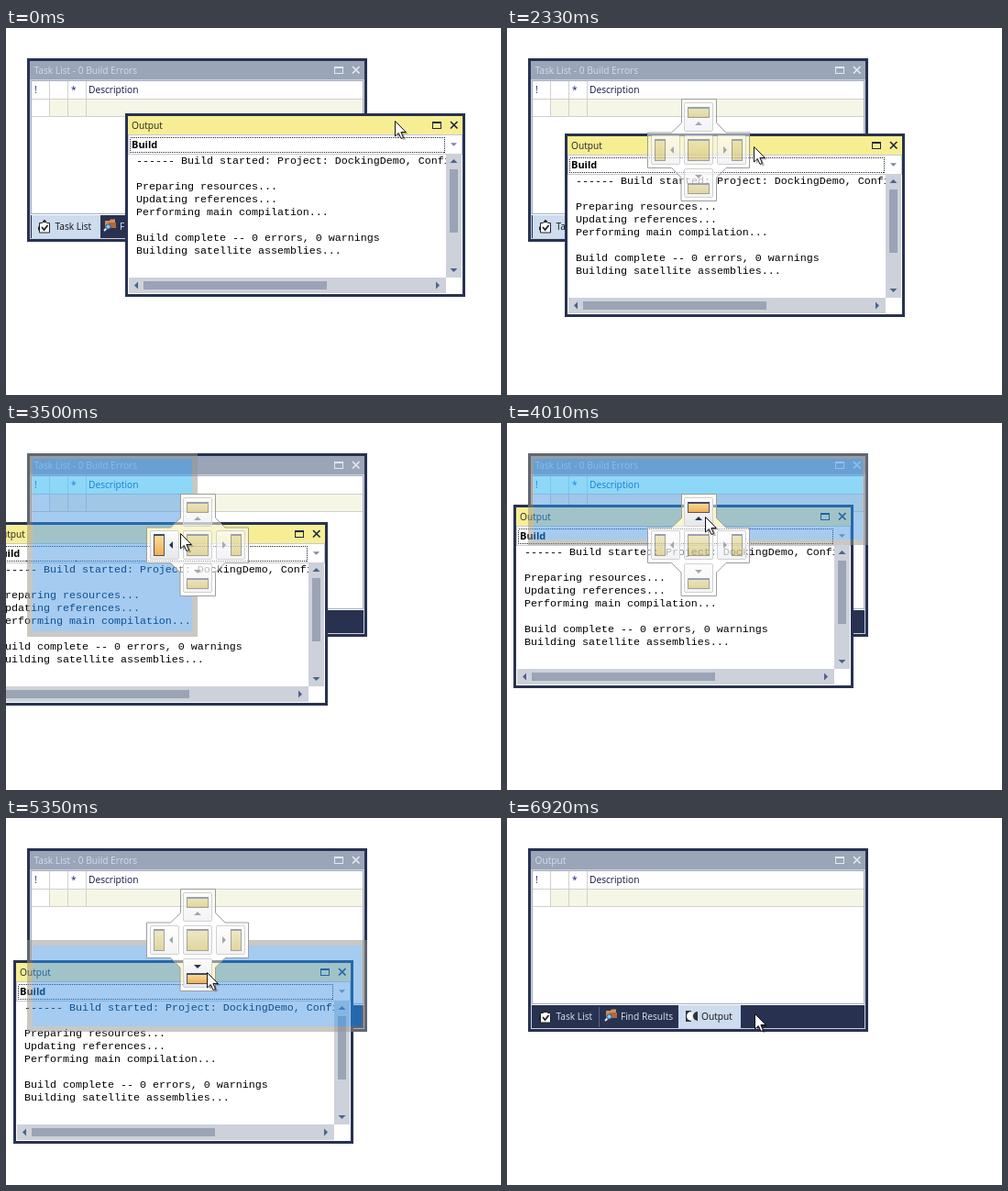
Animation, 540 px wide and 400 px high, one loop 8480 ms. Source, as an HTML page:

```html
<!DOCTYPE html>
<html lang="en">
<head>
<meta charset="utf-8">
<title>Docking windows</title>
<style>
html, body { margin: 0; width: 100%; height: 100%; overflow: hidden; background: #fff; }
svg { display: block; width: 540px; height: 400px; }
text { font: 10.2px "Open Sans", "Noto Sans", sans-serif; white-space: pre; }
.bold { font-size: 11px; font-weight: 700; }
.mono { font: 11.67px "Liberation Mono", monospace; }
rect { shape-rendering: crispEdges; }
#preview rect { clip-path: url(#around); }
.tint { mix-blend-mode: multiply; }
.glow { mix-blend-mode: screen; }
.face { fill-opacity: .5; }
.icon { fill: url(#pale); stroke: #a9a698; mix-blend-mode: multiply; }
.strip { fill: #9ba1af; }
.btn .tri { fill: #a3a7ae; }
.on .face { fill-opacity: 1; }
.on .icon { fill: url(#warm); stroke: #55545a; mix-blend-mode: normal; }
.on .strip { fill: #424c66; }
.on .tri { fill: #263354; }
</style>
</head>
<body>
<svg id="stage" viewBox="0 0 540 400" xmlns="http://www.w3.org/2000/svg"></svg>
<script>
const LOOP = 8480, STEP = 30, DOCKED = 6740;
const NAVY = '#283250', STEEL = '#9aa5b7', BAR = '#cdd1da', THUMB = '#9ba4b5', LINE = '#d0d0d0';

// time, pointer x, y, window x, y
const keys = [
  [0, 424, 101, 130, 93],
  [660, 424, 101, 130, 93],
  [1080, 338, 107, 130, 93],
  [1850, 338, 107, 130, 93],
  [2510, 254, 134, 45, 121],
  [2810, 254, 134, 46, 121],
  [3290, 170, 133, -38, 120],
  [3680, 206, 109, -3, 96],
  [4010, 216, 102, 7, 89],
  [4240, 216, 102, 7, 89],
  [4750, 218, 168, 8, 155],
  [5320, 218, 168, 8, 155],
  [5770, 265, 173, 55, 157],
  [6140, 265, 173, 55, 157],
  [DOCKED, 270, 204, 60, 188],
  [6920, 270, 213, 60, 188],
  [LOOP, 270, 213, 60, 188]
];

const rect = (x, y, w, h, fill, more = '') =>
  `<rect x="${x}" y="${y}" width="${w}" height="${h}" fill="${fill}" ${more}/>`;
const frame = (x, y, w, h, stroke, more = '') =>
  rect(x + .5, y + .5, w - 1, h - 1, 'none', `stroke="${stroke}" ${more}`);
const text = (x, y, s, fill = '#000', cls = '') =>
  `<text x="${x}" y="${y}" fill="${fill}" class="${cls}">${s}</text>`;
const path = (d, fill, more = '') => `<path d="${d}" fill="${fill}" ${more}/>`;
const group = (id, body) => `<g id="${id}">${body}</g>`;
const tri = (x, y, turn, size = 4, fill = '#4b6489', cls = '') =>
  path(`M${-size} ${size / 2}L0 ${-size / 2}L${size} ${size / 2}Z`, fill,
    `class="${cls}" transform="translate(${x} ${y}) rotate(${turn})"`);

// maximize and close glyphs
const caption = (x, y, c) => frame(x, y, 10, 8, c) + rect(x, y, 10, 2, c) +
  path(`M${x + 20} ${y}l7.5 7.5m0 -7.5l-7.5 7.5`, 'none', `stroke="${c}" stroke-width="1.7"`);

const listIcon = path('M36.5 212.5h3l2.5 -3.5l2.5 3.5h3v10.5h-11z', '#fff', 'stroke="#222"') +
  path('M39 217l2.5 3l4 -5', 'none', 'stroke="#222" stroke-width="1.8"') +
  path('M40 212a2 2 0 0 1 4 0', '#222') + path('M35 216l2 2l-2 3', '#222');
const findIcon = path('M108 210h5l1 -1.5h5v9h-11z', '#d68d50') + rect(112, 212, 8, 6, '#ab6b3e') +
  path('M107 221l3 -3', 'none', 'stroke="#e8edf5" stroke-width="2"') +
  '<circle cx="111.5" cy="216.5" r="2.6" fill="#8fc3ee" stroke="#1e5d9e"/>';
const outIcon = rect(195, 210, 6, 12, '#333') + path('M201 211a5 5 0 0 0 0 10z', '#fff') +
  path('M208 211a5 5 0 0 0 0 10z', '#333') + path('M203 212a5 5 0 0 0 0 8', 'none', 'stroke="#fff"');

function taskWindow() {
  const cols = [47, 67, 87].map(x => rect(x, 58, 1, 39, LINE)).join('');
  const tabs = group('open', rect(28, 204, 75, 25, '#cddcee')) +
    group('added', rect(100, 206, 1, 22, '#59657f') + rect(187, 204, 68, 25, '#cddcee') +
      outIcon + text(212, 220, 'Output', '#111')) +
    listIcon + text(53.5, 220, 'Task List', '#111', 'first') +
    findIcon + text(124, 220, 'Find Results', '#dce3f0');
  return rect(23, 33, 371, 200, NAVY) + rect(26, 36, 365, 21, STEEL) +
    `<text id="head" x="30.5" y="50" fill="#d3dced"></text>` + caption(358, 42, '#e3e9f3') +
    rect(26, 56, 365, 174, '#c8d2e2') + rect(27, 57, 363, 147, '#fff') +
    frame(27, 57, 363, 146, '#a8b0bf') +
    rect(48, 78, 341, 18, '#f5f6e6') + rect(28, 77, 361, 1, LINE) + rect(28, 96, 361, 1, LINE) + cols +
    text(31, 71, '!', '#16207a') + text(71, 71, '*', '#16207a') + text(90, 71, 'Description', '#101540') +
    rect(27, 204, 363, 25, NAVY) + tabs;
}

function outputWindow() {
  const lines = ['------ Build started: Project: DockingDemo, Configuration', '',
    'Preparing resources...', 'Updating references...', 'Performing main compilation...', '',
    'Build complete -- 0 errors, 0 warnings', 'Building satellite assemblies...'];
  return rect(0, 0, 371, 200, NAVY) + rect(3, 3, 365, 194, '#fff') + rect(3, 3, 365, 21, '#f7ee94') +
    text(7, 17, 'Output', '#222') + caption(335, 9, '#222840') +
    frame(3, 23, 365, 22, '#c3c9d4') +
    frame(5, 26, 344, 17, '#222', 'stroke-dasharray="1 1"') +
    text(7, 38, 'Build', '#000', 'bold') + tri(358.5, 34, 180, 3.5, '#7d889b') +
    `<g clip-path="url(#page)">${lines.map((s, i) => text(12, 55 + i * 14, s, '#000', 'mono')).join('')}</g>` +
    rect(350, 44, 17, 135, BAR) + rect(354, 61, 9, 69, THUMB) + tri(358.5, 52, 0) + tri(358.5, 171, 180) +
    rect(4, 179, 346, 17, BAR) + rect(20, 183, 200, 9, THUMB) + tri(12, 187.5, 270) + tri(341, 187.5, 90);
}

function button(id, x, y, [ix, iy, iw, ih], arrow) {
  return `<g id="${id}" class="btn">` +
    rect(x + .5, y + .5, 31, 31, 'url(#face)', 'class="face" stroke="#cfd1d4" rx="2"') +
    rect(ix + .5, iy + .5, iw, ih, 'none', 'class="icon"') +
    rect(ix, iy, iw + 1, 2, 'none', 'class="strip"') + (arrow ? tri(...arrow, 4, '#888', 'tri') : '') + '</g>';
}

const CROSS = 'M190.5 77.5V103.5L179.5 114H153.5V152.5H179.5L190 163V188.5H228.5V163L239 152.5H264.5V114H239L228.5 103.5V77.5Z';

function compass() {
  return path(CROSS, '#fff', 'opacity=".5"') +
    button('mid', 193, 117, [197, 121, 23, 23]) +
    button('top', 193, 81, [197, 86, 23, 11], [209, 104, 0]) +
    button('bottom', 193, 153, [197, 169, 23, 11], [209, 162, 180]) +
    button('left', 157, 117, [161, 121, 11, 23], [180, 133, 270]) +
    button('right', 229, 117, [245, 121, 11, 23], [238, 133, 90]) +
    path(CROSS, 'none', 'stroke="#9c9c9c"');
}

const layer = (cls, tint, glow) =>
  rect(0, 0, 0, 0, tint, `class="${cls} tint"`) + rect(0, 0, 0, 0, glow, `class="${cls} glow"`);
const gradient = (id, a, b) => `<linearGradient id="${id}" x2="0" y2="1">` +
  `<stop stop-color="${a}"/><stop offset="1" stop-color="${b}"/></linearGradient>`;
const arrowShape = 'M0 0V16.5L3.8 13L6.5 19L9 17.9L6.4 12H11.8Z';

// the preview is cut out around the compass
document.getElementById('stage').innerHTML =
  `<defs>${gradient('pale', '#f1ebc6', '#ebdfa4')}${gradient('warm', '#fbe0a0', '#efad55')}` +
  `${gradient('face', '#fdfdfd', '#e6e7ea')}` +
  `<clipPath id="page"><rect x="4" y="45" width="346" height="134"/></clipPath>` +
  `<clipPath id="around"><path clip-rule="evenodd" d="M0 0H540V400H0Z${CROSS}"/></clipPath></defs>` +
  rect(0, 0, 540, 400, '#fff') + group('task', taskWindow()) + group('out', outputWindow()) +
  group('preview', layer('pane', '#a1b3dc', '#0c508f') + layer('band', '#daffff', '#003c78') +
    rect(0, 0, 0, 0, 'none', 'class="edge" stroke="#969690" stroke-width="6" stroke-opacity=".52"')) +
  group('compass', compass()) +
  group('pointer', path(arrowShape, '#000', 'opacity=".28" transform="translate(2.5 2)"') +
    path(arrowShape, '#fff', 'stroke="#111"'));

const $ = id => document.getElementById(id);
const set = (el, attrs) => { for (const k in attrs) el.setAttribute(k, attrs[k]); };
const show = (id, on) => set($(id), { visibility: on ? 'inherit' : 'hidden' });
const first = document.querySelector('.first');

const zones = {
  mid: [192, 116, 226, 150], top: [190, 78, 228, 115], bottom: [190, 152, 228, 188],
  left: [154, 114, 191, 152], right: [227, 114, 264, 152]
};
const panes = {
  mid: [23, 33, 371, 200], top: [23, 33, 371, 100], bottom: [23, 133, 371, 100],
  left: [23, 33, 186, 200], right: [209, 33, 185, 200]
};

// pointer and window place; the window trails by `lag` ms
function pose(t, lag) {
  const i = Math.max(1, keys.findIndex(k => t < k[0]));
  const a = keys[i - 1], b = keys[i];
  const held = Math.floor((t - a[0]) / STEP) * STEP;
  const p = Math.max(0, held - lag) / (b[0] - a[0]);
  const e = p * p * (3 - 2 * p);
  return a.map((v, n) => Math.round(v + (b[n] - v) * e));
}

function place(cls, x, y, width, height) {
  for (const el of document.querySelectorAll('.' + cls)) set(el, { x, y, width, height });
}

function draw(t) {
  const [, cx, cy] = pose(t, 0);
  const [, , , wx, wy] = pose(t, 15);
  const docked = t >= DOCKED, drag = t >= 1910 && !docked;
  const hit = drag && Object.keys(zones).find(k => {
    const [l, u, r, d] = zones[k];
    return cx >= l && cx <= r && cy >= u && cy <= d;
  });

  set($('out'), { transform: `translate(${wx} ${wy})` });
  set($('pointer'), { transform: `translate(${cx + .5} ${cy + .5})` });
  show('out', !docked);
  show('compass', drag);
  show('open', !docked);
  show('added', docked);
  set(first, { fill: docked ? '#dce3f0' : '#111' });
  $('head').textContent = docked ? 'Output' : 'Task List - 0 Build Errors';

  for (const k in zones) $(k).classList.toggle('on', k === hit);
  show('preview', !!hit);
  if (hit) {
    const [x, y, w, h] = panes[hit];
    place('pane', x + 6, y + 6, w - 12, h - 12);
    place('edge', x + 3, y + 3, w - 6, h - 6);
    place('band', x + 6, 58, w - 12, y < 58 ? 19 : 0);
  }
}

const start = performance.now();
function tick() {
  draw((performance.now() - start) % LOOP);
  requestAnimationFrame(tick);
}
tick();
</script>
</body>
</html>
```
